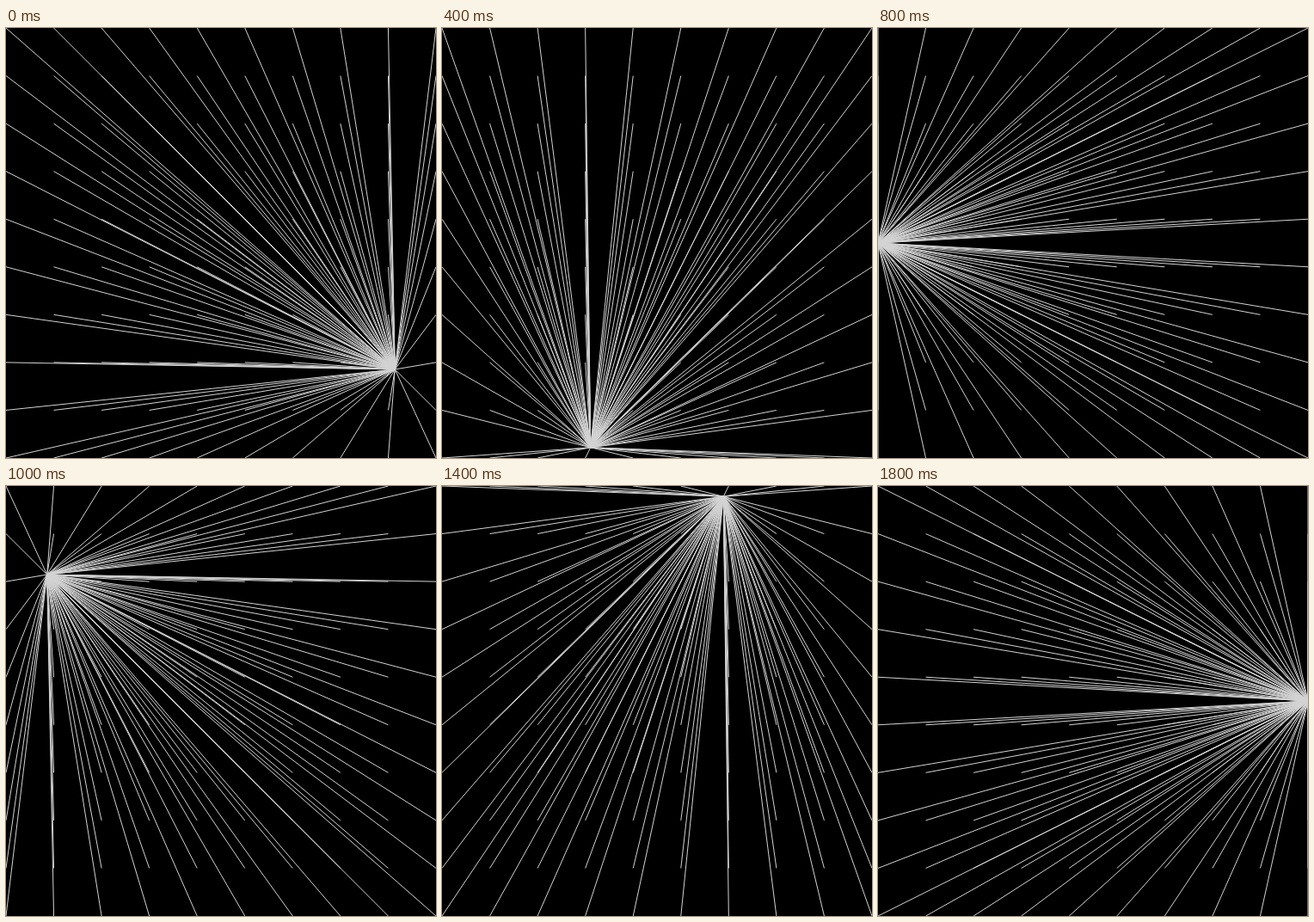
Animation, 500 px wide and 500 px high, one loop 2000 ms. Source, as an HTML page:

```html
<!DOCTYPE html>
<html lang="en">
<head>
<meta charset="utf-8">
<title>Orbiting rays</title>
<style>
  html, body { margin: 0; width: 100%; height: 100%; overflow: hidden; background: #000; }
  svg { display: block; width: 500px; height: 500px; }
  line { stroke: #d3d3d3; stroke-width: 1; }
</style>
</head>
<body>
<svg id="stage" viewBox="0 0 500 500"></svg>
<script>
  const SIZE = 500, GRID = 10, STEPS = 10, STEP_MS = 200;
  const stage = document.getElementById('stage');
  const gap = SIZE / (GRID - 1);
  const rays = [];

  function addRay(x, y) {
    const ray = document.createElementNS('http://www.w3.org/2000/svg', 'line');
    ray.setAttribute('x1', x);
    ray.setAttribute('y1', y);
    stage.append(ray);
    rays.push(ray);
  }

  for (let i = 0; i < GRID; i++) {
    for (let j = 0; j < GRID; j++) addRay(i * gap, j * gap);
  }

  // All rays meet at a hub that jumps around a circle
  function draw(step) {
    const angle = (step + 1) * 2 * Math.PI / STEPS;
    const r = SIZE / 2;
    const x = r + r * Math.cos(angle);
    const y = r + r * Math.sin(angle);
    for (const ray of rays) {
      ray.setAttribute('x2', x);
      ray.setAttribute('y2', y);
    }
  }

  let shown = -1;
  function tick() {
    const step = Math.floor(performance.now() / STEP_MS) % STEPS;
    if (step !== shown) draw(shown = step);
    requestAnimationFrame(tick);
  }
  tick();
</script>
</body>
</html>
```
